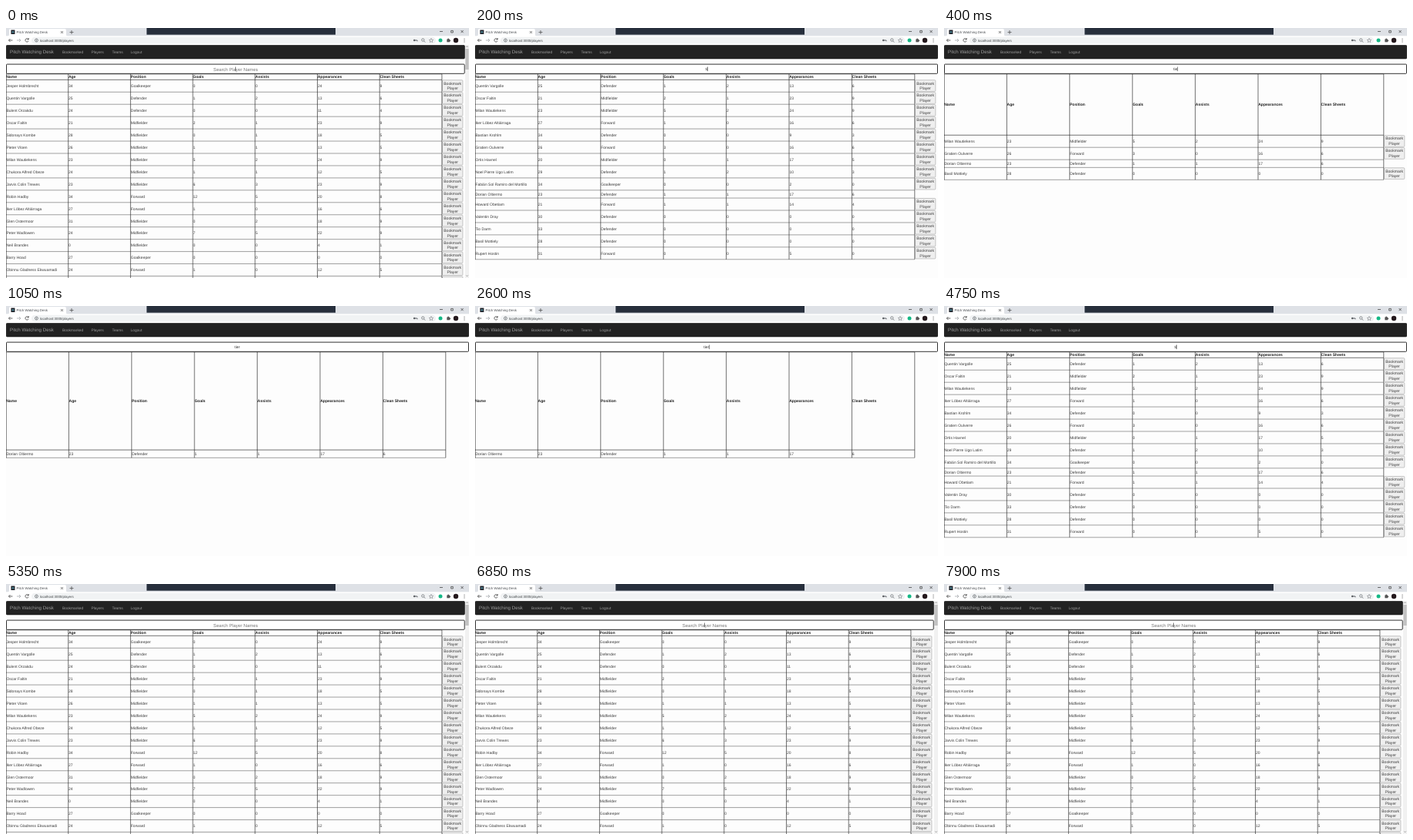
An HTML page for the animation above (8000 ms loop, 600x325 px).

```html
<!DOCTYPE html>
<html lang="en">
<head>
<meta charset="utf-8">
<title>Player search</title>
<style>
html, body { margin: 0; width: 100%; height: 100%; overflow: hidden; background: #fdfdfd; }
svg { display: block; width: 600px; height: 325px; }
text { font-family: "Liberation Sans", Arial, sans-serif; text-rendering: geometricPrecision; white-space: pre; }
</style>
</head>
<body>
<svg id="stage" viewBox="0 0 600 325">
  <g id="page"></g>
  <g id="browser"></g>
  <rect id="caret" y="50.5" width=".7" height="5.6" fill="#444"/>
</svg>
<script>
const LOOP = 8000;
const APP = 'Pitch Watching Desk';
const HEADS = ['Name', 'Age', 'Position', 'Goals', 'Assists', 'Appearances', 'Clean Sheets'];
const ROLES = { G: 'Goalkeeper', D: 'Defender', M: 'Midfielder', F: 'Forward' };

// name, age, role, goals, assists, appearances, clean sheets; * marks a bookmarked player
const players = `Jesper Holmbrecht|34|G|0|0|24|9
Quentin Vargolle|25|D|1|2|13|6
Bulent Orzakdu|24|D|0|0|11|4
Oscar Faltin|21|M|2|1|23|9
Sidonays Kombe|28|M|0|1|18|5
Pieter Vloen|26|M|1|1|13|5
Milan Wautiekens|23|M|5|2|24|9
Chukora Alfred Obeze|24|M|1|1|12|5
Jarvis Colin Trewes|23|M|6|3|23|9
Robin Hadby|34|F|12|5|20|8
Iker Lóbez Altiárraga|27|F|1|0|16|6
Glen Ostermoor|31|M|0|2|18|9
Peter Wadlowen|24|M|7|5|22|9
Neil Brandes|0|M|0|0|4|1
Barry Hoad|27|G|0|0|0|0
Obinnu Gladness Ekwuamadi|24|F|1|0|12|5
Bastian Krohlm|34|D|0|0|9|3
Gratien Oulverre|26|F|3|0|16|6
Ortis Havnel|20|M|0|1|17|5
Noel Pierre Ugo Latim|29|D|1|2|10|3
Fabián Sol Ramiro del Mortillo|34|G|0|0|2|0
Dorian Oltiermo|23|D|1|1|17|6|*
Howard Obetiam|21|F|1|1|14|4
Valentin Dray|30|D|0|0|0|0
Tio Darm|33|D|0|0|0|0
Basil Mottiely|28|D|0|0|0|0
Rupert Hostin|31|F|0|0|5|0`.split('\n').map(line => {
  const cells = line.split('|');
  cells[2] = ROLES[cells[2]];
  return { cells: cells.slice(0, 7), saved: cells[7] === '*' };
});

const typed = [[0, ''], [100, 'ti'], [400, 'tie'], [1050, 'tier'], [3850, 'tie'], [4750, 'ti'], [5350, '']];
const caretLit = [[0, 1050], [1550, 2050], [2600, 3150], [3850, 5350], [5800, 6300], [6850, 7400], [7900, LOOP]];
const caretX = { '': 297.2, ti: 301.1, tie: 302.4, tier: 303.4 };

const byId = id => document.getElementById(id);
const rect = (x, y, w, h, fill, extra = '') =>
  `<rect x="${x}" y="${y}" width="${w}" height="${h}" fill="${fill}" ${extra}/>`;
const text = (x, y, s, size = 5, fill = '#3c3c3c', extra = '') =>
  `<text x="${x}" y="${y + size * .36}" font-size="${size}" fill="${fill}" ${extra}>${s}</text>`;
const path = (d, color = '#5f6368', width = .8, fill = 'none') =>
  `<path d="${d}" stroke="${color}" stroke-width="${width}" fill="${fill}"/>`;
const dot = (x, y, r, fill, extra = '') => `<circle cx="${x}" cy="${y}" r="${r}" fill="${fill}" ${extra}/>`;
const MID = 'text-anchor="middle"';
const BOLD = 'font-weight="700"';

function drawBrowser() {
  const ring = 'stroke="#5f6368" stroke-width=".7"';
  byId('browser').innerHTML =
    rect(0, 0, 600, 10.5, '#dee1e6') +
    path('M2 11Q4 11 4 8V3Q4 1 6 1H76Q78 1 78 3V8Q78 11 80 11Z', 'none', 0, '#fff') +
    rect(182.3, 0, 244.7, 8.7, '#272f3c') +
    rect(6.5, 2.5, 5, 5.5, '#20232a') + dot(9, 5.2, 1.2, '#4b8796') +
    text(13.5, 5.1, APP, 4.4, '#45494d') +
    path('M71 4l3 3m0-3l-3 3M82.5 5.5h5m-2.5-2.5v5', '#444', .7) +
    path('M562 4.5h4M576.7 3.4h2.6v2.6h-2.6zM589.5 3l3.2 3.2m0-3.2l-3.2 3.2', '#333', .7) +
    rect(0, 10.5, 600, 11.5, '#fff') +
    rect(33, 11.8, 524, 8.8, '#f1f3f4', 'rx="4.4"') +
    path('M8.5 16h-5m2-2l-2 2l2 2', '#444') +
    path('M14 16h5m-2-2l2 2l-2 2', '#a5a8ac') +
    path('M29 14.6a2.2 2.2 0 1 0 .2 2.2M29.3 13v2h-2', '#444') +
    dot(39.5, 16, 2, 'none', ring) + path('M39.5 15.6v1.5m0-2.6v.5') +
    text(44, 16.1, 'localhost:3000/players', 4.4, '#3c4043') +
    dot(529.2, 16, 1.3, '#5f6368') + path('M530 16h3v1.3', '#5f6368', 1) +
    dot(540.3, 15.5, 1.7, 'none', ring) + path('M541.5 16.8l1.7 1.7') +
    path('M551 13.5l.8 1.7 1.9.2-1.4 1.3.4 1.8-1.7-.9-1.7.9.4-1.8-1.4-1.3 1.9-.2z', '#5f6368', .5) +
    dot(563, 16, 2.5, '#15b886') +
    rect(571.3, 14.5, 3.8, 3.8, '#555') + dot(573.2, 14.3, .9, '#555') + dot(575.3, 16.4, .9, '#555') +
    dot(583, 16, 3.2, '#25191d') +
    [14, 16, 18].map(y => dot(594, y, .55, '#444')).join('');
}

function drawButton(x, y) {
  return rect(x, y + .4, 26.4, 14.7, '#efefef', 'rx="1" stroke="#a4a4a4" stroke-width=".6"') +
    text(x + 13.2, y + 4.4, 'Bookmark', 5.1, '#3c3c3c', MID) +
    text(x + 13.2, y + 11, 'Player', 5.1, '#3c3c3c', MID);
}

function drawTable(rows, column) {
  const tall = 15.95, short = 10.2, top = 59.8, minBottom = 197.3;
  const height = row => row.saved ? short : tall;
  const total = rows.reduce((sum, row) => sum + height(row), 0);
  const right = column * 7;
  let y = top + Math.max(7.5, minBottom - top - total);
  let out = HEADS.map((h, i) => text(i * column + .2, (top + y) / 2, h, 5.05, '#222', BOLD)).join('');
  let frame = `M0 ${top}H${right}M0 ${y}H${right}`;
  let rules = '';
  for (const row of rows) {
    if (y > 325) break;
    const h = height(row);
    out += row.cells.map((c, i) => text(i * column + .4, y + h / 2, c)).join('');
    if (!row.saved) out += drawButton(right + .6, y);
    y += h;
    rules += `M0 ${y}H${right}`;
  }
  for (let i = 0; i < 8; i++) frame += `M${Math.max(.3, i * column)} ${top}V${y}`;
  return out + path(rules, '#6c6c6c', .65) + path(frame, '#262626', .65);
}

function drawPage(query) {
  const full = query === '';
  const width = full ? 594.7 : 600;
  const rows = players.filter(p => p.cells[0].toLowerCase().includes(query));
  const links = [[73, 'Bookmarked'], [110.5, 'Players'], [137.5, 'Teams'], [161.5, 'Logout']];
  byId('page').innerHTML =
    rect(0, 0, 600, 325, '#fdfdfd') +
    rect(.2, 22.3, width - .4, 17.7, '#222', 'rx="1.5" stroke="#0c0c0c" stroke-width=".5"') +
    text(5, 31.2, APP, 6.2, '#9d9d9d') +
    links.map(([x, s]) => text(x, 31.2, s, 4.85, '#9d9d9d')).join('') +
    drawTable(rows, full ? 80.7 : 81.4) +
    rect(.5, 47.1, width - 1, 12.2, '#fff', 'rx="1" stroke="#1c1c1c" stroke-width=".9"') +
    (full ? text(297.7, 53.4, 'Search Player Names', 5.95, '#757575', MID)
          : text(299.8, 53.4, query, 5, '#333', MID)) +
    (full ? rect(595, 22, 5, 303, '#f1f1f1') + rect(595.4, 27, 4.2, 27, '#c1c1c1') +
      path('M596.3 25l1.2-1.3l1.2 1.3M596.3 321.5l1.2 1.3l1.2-1.3', '#666', .6) : '');
}

let shown = null;
function render(now) {
  const t = now % LOOP;
  const query = typed.filter(([at]) => at <= t).pop()[1];
  if (query !== shown) drawPage(shown = query);
  const lit = caretLit.some(([from, to]) => t >= from && t < to);
  byId('caret').setAttribute('x', caretX[query]);
  byId('caret').setAttribute('visibility', lit ? 'visible' : 'hidden');
}

drawBrowser();
const start = performance.now();
function frame() {
  render(performance.now() - start);
  requestAnimationFrame(frame);
}
frame();
</script>
</body>
</html>
```
